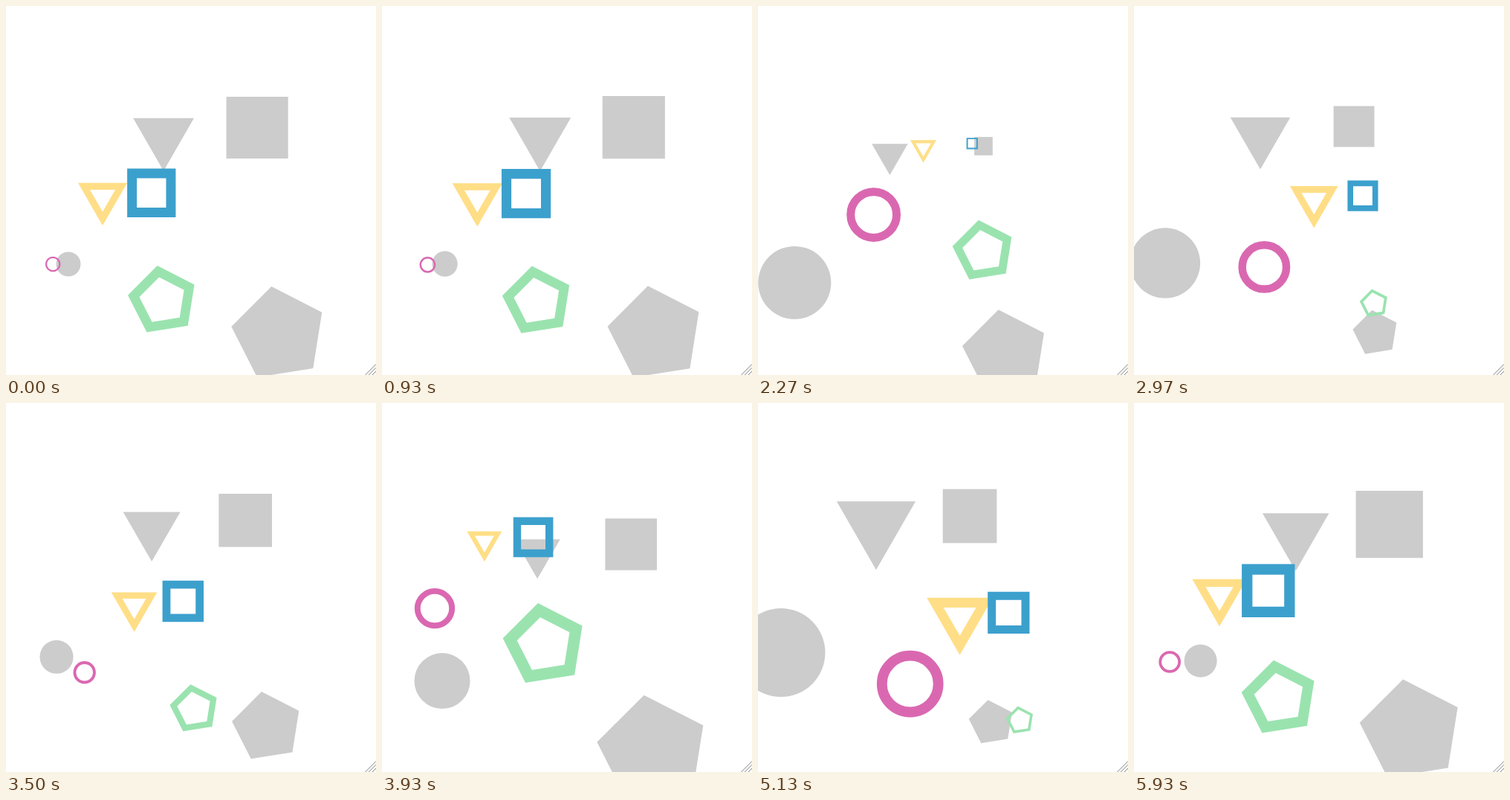
An HTML page with a canvas that plays this animation: 498x496 px, repeating every 6.01 s.

```html
<!DOCTYPE html>
<html lang="en">
<head>
<meta charset="utf-8">
<title>Parallax shapes</title>
<style>
  html, body { margin: 0; width: 100%; height: 100%; overflow: hidden; background: #fff; }
  canvas { display: block; }
</style>
</head>
<body>
<canvas id="stage" width="498" height="496"></canvas>
<script>
const ctx = document.getElementById('stage').getContext('2d');
const LOOP = 6010, START = 900, STEP = 100 / 3, LAST = 151;
const BACK = .15, FRONT = -.4;

// The pointer circles the stage twice through these points
const path = [
  { t: 900, x: 40.5, y: 347 }, { t: 1200, x: 6, y: 363 },
  { t: 1530, x: 74, y: 325 }, { t: 2130, x: 227, y: 180 },
  { t: 2450, x: 320, y: 214 }, { t: 2970, x: 320.5, y: 357.5 },
  { t: 3400, x: 190, y: 409 }, { t: 3770, x: 30, y: 262 },
  { t: 3930, x: 58.5, y: 171 }, { t: 4300, x: 267, y: 67 },
  { t: 4630, x: 472.5, y: 155.5 }, { t: 5130, x: 395.5, y: 422.5 },
  { t: 5500, x: 190, y: 409 }, { t: 5930, x: 3, y: 349.5 }
];

const shapes = [
  { x: 78.3, y: 347, sides: 0, turn: 0, base: 10.8, color: '#da68b1' },
  { x: 189.7, y: 196.9, sides: 3, turn: 90, base: 15.5, color: '#ffde87' },
  { x: 299.3, y: 187.4, sides: 4, turn: 45, base: 13.2, color: '#3ca0cd' },
  { x: 324.8, y: 428.9, sides: 5, turn: 45, base: 20.5, color: '#9ae3af' }
];

function slope(i, axis) {
  const a = path[Math.max(i - 1, 0)], b = path[Math.min(i + 1, path.length - 1)];
  return (b[axis] - a[axis]) / (b.t - a.t);
}

// Smooth cubic curve through the path points
function pointerAt(time) {
  let i = 0;
  while (i < path.length - 2 && time >= path[i + 1].t) i++;
  const a = path[i], b = path[i + 1], span = b.t - a.t;
  const s = Math.min(1, Math.max(0, (time - a.t) / span)), r = 1 - s;
  const along = k =>
    r * r * (1 + 2 * s) * a[k] + s * s * (3 - 2 * s) * b[k] +
    span * s * r * (r * slope(i, k) - s * slope(i + 1, k));
  return { x: along('x'), y: along('y') };
}

function trace({ sides, turn }, x, y, radius) {
  ctx.beginPath();
  if (!sides) ctx.arc(x, y, radius, 0, 2 * Math.PI);
  for (let i = 0; i < sides; i++) {
    const a = (turn + i * 360 / sides) * Math.PI / 180;
    ctx.lineTo(x + radius * Math.cos(a), y + radius * Math.sin(a));
  }
  ctx.closePath();
}

function drawGrip() {
  ctx.strokeStyle = '#808080';
  ctx.lineWidth = 1;
  for (let size = 5; size < 16; size += 4.75) {
    ctx.beginPath();
    ctx.moveTo(498 - size, 496);
    ctx.lineTo(498, 496 - size);
    ctx.stroke();
  }
}

function draw(time) {
  const step = Math.floor((time - START + 3.5) / STEP);
  const pointer = pointerAt(START + Math.min(LAST, Math.max(0, step)) * STEP);
  ctx.fillStyle = '#fff';
  ctx.fillRect(0, 0, 498, 496);

  // Each layer shifts and grows with the distance to the pointer
  const place = (s, shift, base, grow) => {
    const dx = s.x - pointer.x, dy = s.y - pointer.y, dist = Math.hypot(dx, dy);
    trace(s, s.x + shift * dx, s.y + shift * dy, base + grow * dist);
    return dist;
  };

  ctx.fillStyle = '#ccc';
  for (const s of shapes) {
    place(s, BACK, s.base, .15);
    ctx.fill();
  }
  for (const s of shapes) {
    ctx.lineWidth = .8 + .04 * place(s, FRONT, s.base / 2, .1);
    ctx.strokeStyle = s.color;
    ctx.stroke();
  }
  drawGrip();
}

const begin = performance.now();
function tick() {
  draw((performance.now() - begin) % LOOP);
  requestAnimationFrame(tick);
}
tick();
</script>
</body>
</html>
```
